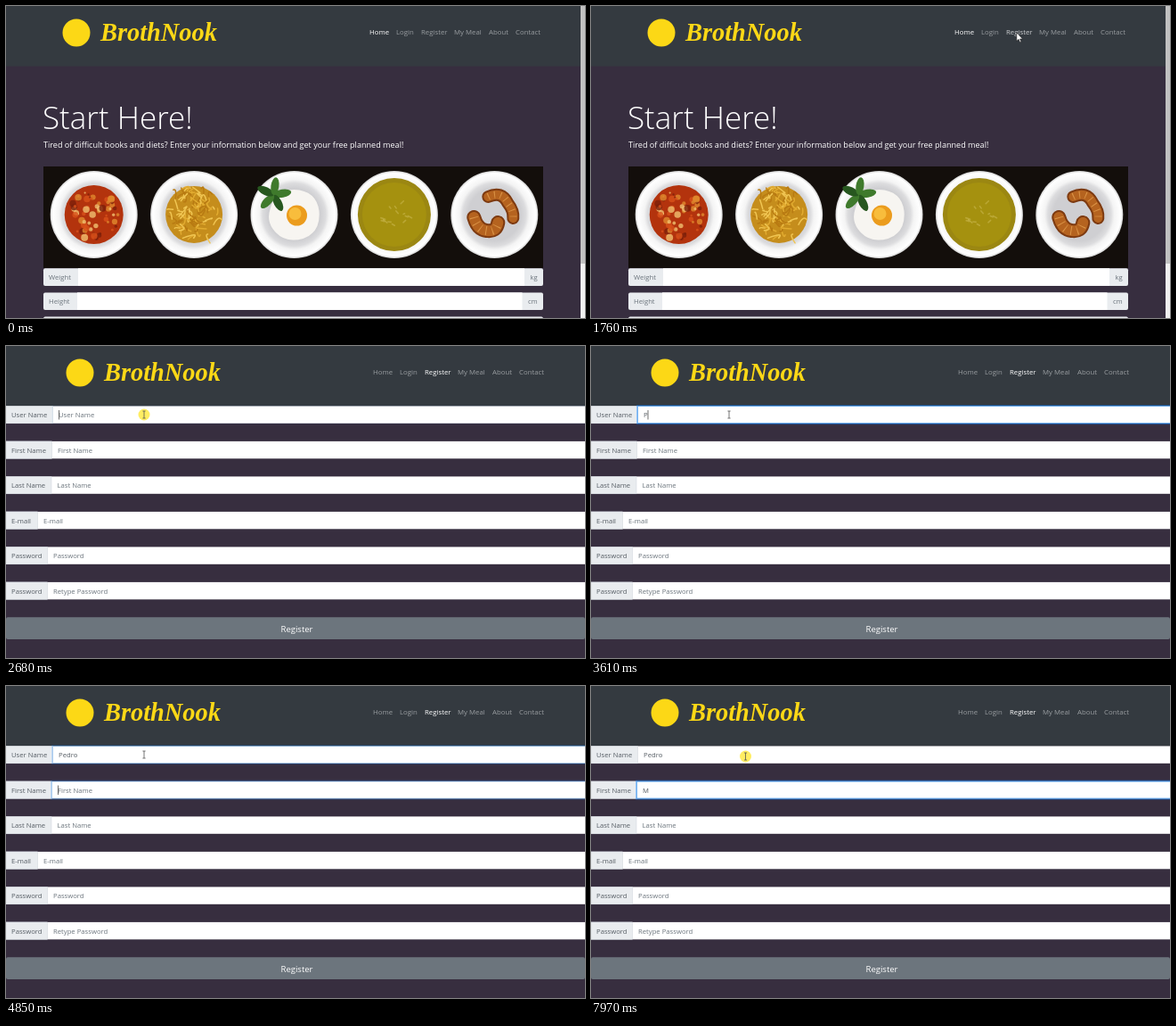
An HTML page that plays this animation: 650x350 px, repeating every 8 s.

```html
<!DOCTYPE html>
<html lang="en">
<head>
<meta charset="utf-8">
<title>Meal planner sign-up</title>
<style>
html, body { margin: 0; width: 100%; height: 100%; overflow: hidden; background: #372e3f; }
svg { display: block; width: 100vw; height: 100vh; }
text { font: 7.7px "Open Sans", "Noto Sans", sans-serif; fill: #6c757d; }
.label, .typed { fill: #565d64; }
.nav { font-size: 7.8px; fill: #999da0; }
.active { fill: #fff; }
.brand { font: italic bold 28.4px "Liberation Serif", serif; fill: #fcd816; }
.title { font-size: 35px; font-weight: 300; fill: #fff; }
.lead { font-size: 9.08px; fill: #fff; }
.button { font-size: 9.5px; fill: #fff; text-anchor: middle; }
</style>
</head>
<body>
<svg id="stage" viewBox="0 0 650 350"></svg>
<script>
const LOOP = 8000;
const USER = 'Pedro';
const KEY_TIMES = [3610, 3930, 4010, 4240, 4320];
const FOCUS_USER = 2680, FOCUS_FIRST = 4790, TYPE_FIRST = 5260, OPEN_FORM = 1830;
const CLICKS = [[1610, 1760], [2680, 2830], [7880, LOOP]];
const PATH = [
  [230, 552, 331], [890, 477, 29],
  [2070, 478, 30], [2290, 300, 72], [2430, 149, 97], [2530, 155, 77],
  [7210, 155, 77], [7370, 184, 69],
  [7680, 184, 69], [7880, 173.5, 79]
];
const FIELDS = [
  ['User Name', 'User Name', 52.5], ['First Name', 'First Name', 51.5],
  ['Last Name', 'Last Name', 51], ['E-mail', 'E-mail', 35.5],
  ['Password', 'Password', 46.5], ['Password', 'Retype Password', 46.5]
];
const ROW_H = 19.4;
const rowY = i => 67.4 + 39.5 * i;

let seed = 7;
const random = () => (seed = seed * 16807 % 2147483647) / 2147483647;

const text = (x, y, s, cls = '', id = '') => `<text x="${x}" y="${y}" class="${cls}" id="${id}">${s}</text>`;
const rect = (x, y, w, h, fill, extra = '') =>
  `<rect x="${x}" y="${y}" width="${w}" height="${h}" fill="${fill}" ${extra}/>`;
const circle = (x, y, r, fill, extra = '') => `<circle cx="${x}" cy="${y}" r="${r}" fill="${fill}" ${extra}/>`;
const line = (d, color, w, extra = '') =>
  `<path d="${d}" fill="none" stroke="${color}" stroke-width="${w}" stroke-linecap="round" ${extra}/>`;
const repeat = (n, fn) => Array.from({ length: n }, (_, i) => fn(i)).join('');

function header(width, dx, active) {
  const links = [['Home', 408], ['Login', 438], ['Register', 466], ['My Meal', 503], ['About', 542], ['Contact', 572]];
  return rect(0, 0, width, 67.6, '#343a40') + `<g transform="translate(${dx})">` +
    circle(79, 30, 15.5, '#fcd816') + text(106, 39, 'BrothNook', 'brand') +
    links.map(([s, x]) => text(x, 31.6, s, s === active ? 'nav active' : 'nav', s + dx)).join('') + '</g>';
}

// Random point inside a disc around the origin
function spot(r) {
  const a = random() * 2 * Math.PI, d = r * Math.sqrt(random());
  return [Math.cos(a) * d, Math.sin(a) * d];
}

function stew() {
  const colors = ['#e08a2e', '#7c1f0a', '#d8511a', '#f0c070'];
  return circle(0, 0, 33, '#b3330d') + repeat(60, i => {
    const [x, y] = spot(28);
    return circle(x, y, 1 + random() * 3, colors[i % 4], 'opacity=".8"');
  });
}

function pasta() {
  const colors = ['#f0c552', '#b87a12', '#e2ab30'];
  return circle(0, 0, 32, '#c58d1c') + repeat(70, i => {
    const [x, y] = spot(28), [a, b] = spot(12), [c, d] = spot(13);
    return line(`M${x} ${y}q${a} ${b} ${c} ${d}`, colors[i % 3], 1.5);
  });
}

function egg() {
  return '<path d="M-27-6Q-22-27 0-28Q25-27 28-4Q30 20 10 27Q-12 33-24 16Q-31 6-27-6Z" fill="#f7f5f1"/>' +
    circle(3, 1, 11.5, '#eb9c1d') + circle(1, -1, 7, '#f8bd3c') +
    repeat(5, i => `<ellipse cx="10" rx="10" ry="4.5" fill="${i % 2 ? '#27571f' : '#3f7a2c'}" ` +
      `transform="translate(-23-22) rotate(${i * 72 - 10})"/>`);
}

function soup() {
  return circle(0, 0, 41, '#9b8712') + circle(0, 0, 36, '#a5910f') + repeat(14, () => {
    const [x, y] = spot(17);
    return line(`M${x} ${y}l${random() * 9 - 4} ${random() * 7 - 3}`, '#c3b044', 1.6, 'opacity=".7"');
  });
}

function croissants() {
  const roll = (d, w) => line(d, '#7d3a10', w) + line(d, '#b5631f', w - 4) +
    line(d, '#d99245', w - 6, 'stroke-dasharray="1 6" style="stroke-linecap:butt"');
  return roll('M-7-20Q8-27 15-13Q22-4 21 4', 14) + roll('M-23 3Q-19 17-9 18Q2 20 4 9', 16);
}

const plates = () => rect(42, 180, 561, 114, '#130e0b') + [stew, pasta, egg, soup, croissants].map((food, i) =>
  `<g transform="translate(${98.7 + 112.4 * i} 234)">` + circle(0, 0, 49, 'url(#plate)') + food() + '</g>').join('');

const measure = (y, name, unit, w, unitX) => rect(42, y, 561, 19.6, '#e9ecef', 'rx="2"') +
  rect(42 + w, y, unitX - 42 - w, 19.6, '#fff') +
  text(48, y + 12.8, name) + text(unitX + 6.4, y + 12.8, unit);

const homePage = () => '<g id="home">' + rect(0, 0, 650, 350, '#372e3f') + header(645, 0, 'Home') +
  text(41, 138, 'Start Here!', 'title') +
  text(42, 159.3, 'Tired of difficult books and diets? Enter your information below and get your free planned meal!', 'lead') +
  plates() + measure(294.3, 'Weight', 'kg', 39, 582) + measure(321.4, 'Height', 'cm', 38, 579.5) +
  rect(42, 348.5, 561, 10, '#e9ecef', 'rx="2"') +
  rect(645, 0, 5, 350, '#f1f1f1') + rect(645, 0, 5, 289, '#c1c1c1') + '</g>';

const formRow = ([label, hint, w], i) => {
  const y = rowY(i), base = y + 13;
  return rect(0, y, 650, ROW_H, '#fff') + rect(0, y, w, ROW_H, '#e9ecef', 'stroke="#ced4da" stroke-width=".5"') +
    text(6, base, label, 'label') + text(w + 6.5, base, hint, '', 'hint' + i) + text(w + 6.5, base, '', 'typed', 'typed' + i) +
    `<g id="glow${i}" opacity="0" fill="none">` +
    `<rect x="${w - .5}" y="${y - .4}" width="605" height="${ROW_H + .8}" stroke="#007bff" stroke-opacity=".4" stroke-width="1.8"/>` +
    `<rect x="${w}" y="${y + .2}" width="605" height="${ROW_H - .4}" stroke="#6aaef0" stroke-width=".8"/></g>`;
};

const formPage = () => '<g id="form">' + rect(0, 0, 650, 350, '#372e3f') + header(650, 4, 'Register') +
  FIELDS.map(formRow).join('') + rect(0, 304.3, 650, 24.6, '#6c757d', 'rx="2"') +
  text(326.5, 320.8, 'Register', 'button') + rect(0, 0, .7, 10.5, '#333', 'id="caret"') + '</g>';

const pointer = 'fill="#fff" stroke="#111" stroke-width=".5"';
stage.innerHTML = `<radialGradient id="plate">
  <stop offset=".6" stop-color="#cfcfd2"/><stop offset=".72" stop-color="#dcdcde"/>
  <stop offset=".8" stop-color="#f4f4f4"/><stop offset=".95" stop-color="#fff"/>
  <stop offset="1" stop-color="#d2d2d2"/></radialGradient>` + homePage() + formPage() +
  '<g id="mouse">' + circle(0, 0, 6.5, '#ffe93b', 'id="click" opacity=".8"') +
  `<path id="arrow" d="M0 0V9.5L2.2 7.5 3.8 11 5.2 10.4 3.7 7.1H6.6Z" ${pointer}/>` +
  `<path id="hand" d="M-.9.6Q0-.6.9.6V4L4.3 5Q5.2 5.4 5 7.5L4 11H-.8L-3.3 7Q-3.6 5.8-2.4 6L-.9 7.2Z" ${pointer}/>` +
  '<path id="beam" d="M-1.6-4H1.6M0-4V4M-1.6 4H1.6" fill="none" stroke="#555" stroke-width=".8"/></g>';

const $ = id => document.getElementById(id);
const show = (id, on) => $(id).style.display = on ? '' : 'none';
const ease = k => k * k * (3 - 2 * k);
const ramp = (t, a, b) => ease(Math.min(1, Math.max(0, (t - a) / (b - a))));

function mouseAt(t) {
  const n = PATH.findIndex(p => p[0] > t);
  if (n < 1) return PATH[n ? PATH.length - 1 : 0].slice(1);
  const [t0, x0, y0] = PATH[n - 1], [t1, x1, y1] = PATH[n];
  const k = ramp(t, t0, t1);
  return [x0 + (x1 - x0) * k, y0 + (y1 - y0) * k];
}

function drawMouse(t) {
  const [x, y] = mouseAt(t), onForm = t >= OPEN_FORM;
  const kind = !onForm ? 'arrow' : x > 466 && y < 38 ? 'hand' : y > 67 && y < 87 ? 'beam' : 'arrow';
  show('mouse', t >= 300);
  $('mouse').setAttribute('transform', `translate(${x} ${y})`);
  ['arrow', 'hand', 'beam'].forEach(id => show(id, id === kind));
  show('click', CLICKS.some(([a, b]) => t >= a && t < b));
  $('Register0').style.fill = x < 496 && y < 40 ? '#ccced0' : '';
}

function drawFields(t) {
  const typed = [USER.slice(0, KEY_TIMES.filter(k => k <= t).length), t >= TYPE_FIRST ? 'M' : ''];
  const firstFocus = ramp(t, FOCUS_FIRST - 20, 4930);
  const glow = [ramp(t, FOCUS_USER - 40, 2900) - firstFocus, firstFocus];
  typed.forEach((s, i) => {
    $('typed' + i).textContent = s;
    show('hint' + i, !s);
    $('glow' + i).setAttribute('opacity', glow[i]);
  });
  // The caret restarts its blink at every key press or change of focus
  const active = t >= FOCUS_FIRST ? 1 : 0;
  const last = [FOCUS_USER, ...KEY_TIMES, FOCUS_FIRST, TYPE_FIRST].filter(k => k <= t).pop();
  show('caret', last && Math.floor((t - 30 - last) / 520) % 2 < 1);
  $('caret').setAttribute('x', FIELDS[active][2] + 6.5 + (typed[active] && $('typed' + active).getComputedTextLength()));
  $('caret').setAttribute('y', rowY(active) + 4.6);
}

function draw(now) {
  const t = now % LOOP, onForm = t >= OPEN_FORM;
  show('home', !onForm);
  show('form', onForm);
  if (onForm) drawFields(t);
  drawMouse(t);
}

const start = performance.now();
function tick() {
  draw(performance.now() - start);
  requestAnimationFrame(tick);
}
tick();
</script>
</body>
</html>
```
